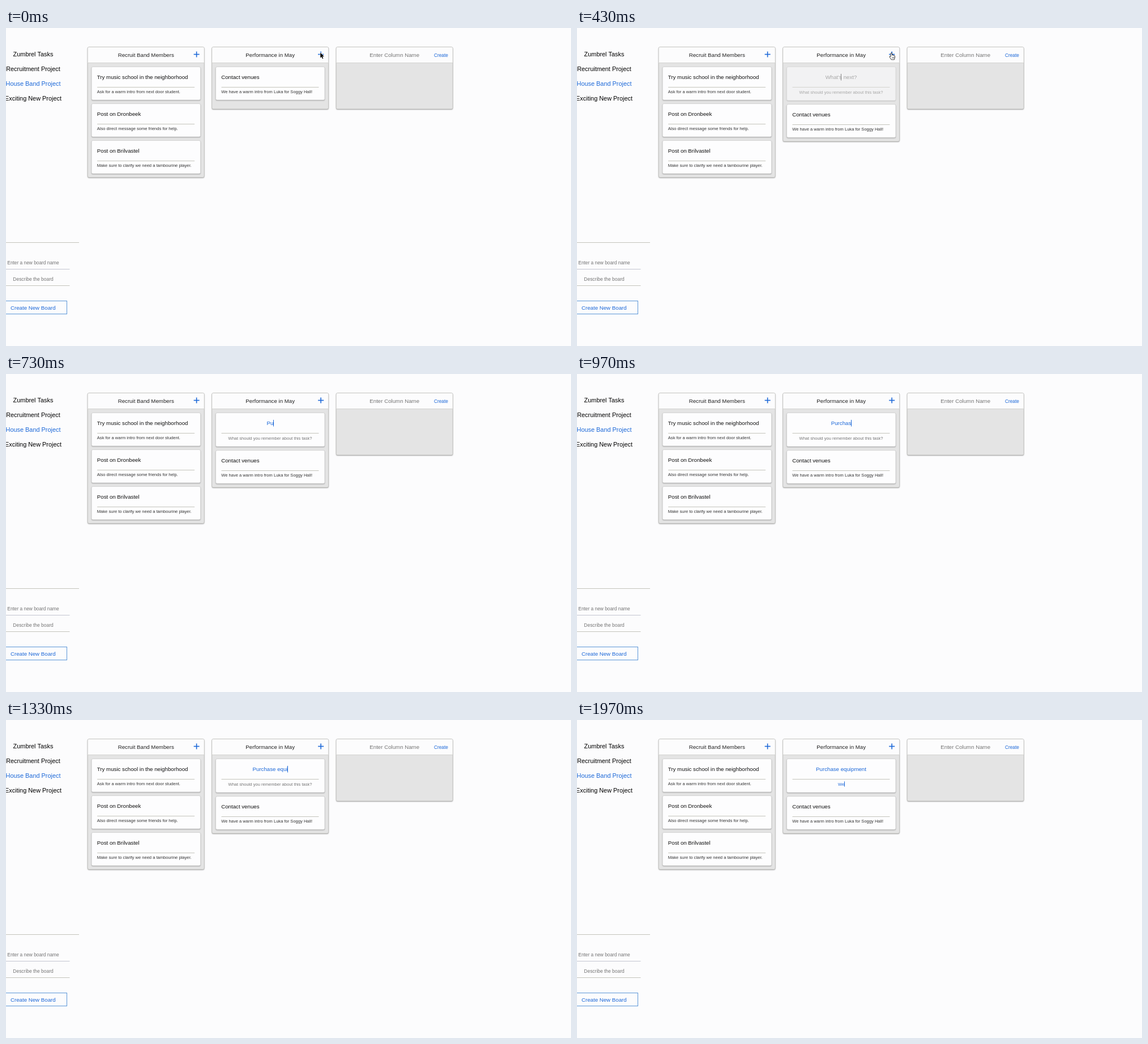
An HTML page with a canvas for the animation above (2000 ms loop, 998 by 561 pixels).

```html
<!DOCTYPE html>
<html lang="en">
<head>
<meta charset="utf-8">
<title>Task board</title>
<style>
html, body { margin: 0; width: 100%; height: 100%; overflow: hidden; background: #fcfcfd; }
canvas { display: block; }
</style>
</head>
<body>
<canvas id="stage" width="998" height="561"></canvas>
<script>
const ctx = document.getElementById('stage').getContext('2d');
const LOOP = 2000, BLUE = '#1c68d8', GREY = '#757575', INK = '#111', SOFT = '#333';
const TRAY = '#e4e4e4', TITLE = 9.7, NOTE = 7.57;

function text(s, x, y, size, color, align = 'left') {
  ctx.font = `${size}px "Liberation Sans", Arial, sans-serif`;
  ctx.textAlign = align;
  ctx.fillStyle = color;
  ctx.fillText(s, x, y);
  return ctx.measureText(s).width;
}

function rule(x1, x2, y, color = '#c4c4bc') {
  ctx.fillStyle = color;
  ctx.fillRect(x1, y, x2 - x1, 1);
}

function panel(x, y, w, h, fill, edge, shade) {
  ctx.save();
  ctx.shadowColor = `rgba(0,0,0,${shade})`;
  ctx.shadowBlur = 2;
  ctx.shadowOffsetY = 1;
  ctx.beginPath();
  ctx.roundRect(x, y, w, h, 2.5);
  ctx.fillStyle = fill;
  ctx.fill();
  ctx.restore();
  ctx.strokeStyle = edge;
  ctx.lineWidth = 0.8;
  ctx.stroke();
}

function column(x, bottom, name, color) {
  panel(x, 33.5, 206, bottom - 33.5, TRAY, '#bdbdb9', 0.4);
  ctx.beginPath();
  ctx.roundRect(x + 0.5, 34, 205, 27, [2, 2, 0, 0]);
  ctx.fillStyle = '#fcfcfd';
  ctx.fill();
  rule(x, x + 206, 61, '#d3d3d0');
  text(name, x + 103, 50.8, TITLE, color, 'center');
}

function plus(x) {
  ctx.fillStyle = BLUE;
  ctx.fillRect(x - 5, 45.7, 10, 1.6);
  ctx.fillRect(x - 0.8, 41.5, 1.6, 10);
}

function cardBase(x, y, h) {
  panel(x, y, 192.5, h, '#fdfdfe', '#d0d0d0', 0.35);
  rule(x + 10, x + 182, Math.floor(y + 35.5));
}

function card(x, y, title, note) {
  cardBase(x, y, 58.5);
  text(title, x + 9.7, y + 21.6, TITLE, INK);
  text(note, x + 9.7, y + 46.5, NOTE, SOFT);
}

function field(value, hint, x, y, size, focused) {
  const w = text(value || hint, x, y, size, value ? BLUE : GREY, 'center');
  if (!focused) return;
  ctx.fillStyle = value ? BLUE : '#333';
  ctx.fillRect(Math.round((value ? x + w / 2 : x) - 0.5), y - size * 0.95, 1, size * 1.2);
}

function typed(s, t, start, step) {
  return s.slice(0, Math.max(0, Math.floor((t - start) / step) + 1));
}

function titleAt(t) {
  if (t < 1150) return typed('Purchase q', t, 640, 50);
  return 'Purchase ' + typed('equipment', t, 1190, 38);
}

function draft(x, t) {
  const inNote = t >= 1660;
  cardBase(x, 68.5, 59.5);
  field(titleAt(t), "What's next?", x + 96, 90.1, TITLE, !inNote);
  field(typed('We', t, 1870, 60), 'What should you remember about this task?',
    x + 96, 115.6, NOTE, inNote);
  // Fade in by thinning a veil of the tray colour.
  ctx.globalAlpha = Math.max(0, 1 - (t - 365) / 120);
  ctx.fillStyle = TRAY;
  ctx.fillRect(x - 2, 66, 196.5, 66);
  ctx.globalAlpha = 1;
}

function shape(d, x, y, fill, edge, width) {
  const path = new Path2D(d);
  ctx.save();
  ctx.translate(x, y);
  ctx.lineJoin = 'round';
  ctx.lineWidth = width;
  ctx.strokeStyle = edge;
  ctx.stroke(path);
  ctx.fillStyle = fill;
  ctx.fill(path);
  ctx.restore();
}

function pointer(t) {
  if (t < 70) {
    shape('M0 0V9.2L2.1 7.2 3.6 10.7 5.1 10.1 3.6 6.7H6.6Z', 555.3, 43.6, '#000', '#fff', 1.2);
  } else if (t < 640) {
    shape('M1.8 1Q2.5 0 3.3 1V4.3Q4.6 3.7 5.1 4.7 6.3 4.2 6.8 5.2 8.2 4.9 8.2 6.2V8.5L7.2 11.6H2.6L0 7.6Q-.7 6.3.5 6.2L1.8 7.3Z',
      552.8, 43.8, '#fff', '#111', 1.5);
    ctx.fillStyle = '#333';
    for (const x of [556.6, 558.2, 559.7]) ctx.fillRect(x, 51, 0.6, 2.8);
  }
}

function sidebar() {
  ['Zumbrel Tasks', 'Recruitment Project', 'House Band Project', 'Exciting New Project']
    .forEach((s, i) => text(s, 48, 50 + 26 * i, 10.9, i === 2 ? BLUE : '#000', 'center'));
  rule(0, 129, 378);
  text('Enter a new board name', 48, 416.6, 8.35, GREY, 'center');
  rule(0, 112.5, 425, '#c3c6d0');
  text('Describe the board', 48, 446, 8.45, GREY, 'center');
  rule(0, 112.5, 454);
  ctx.strokeStyle = '#5b97d8';
  ctx.lineWidth = 1;
  ctx.strokeRect(-11.5, 481.5, 119, 23);
  text('Create New Board', 47.8, 496.7, TITLE, BLUE, 'center');
}

function draw() {
  const t = performance.now() % LOOP, open = t >= 370;
  ctx.fillStyle = '#fcfcfd';
  ctx.fillRect(0, 0, 998, 561);
  sidebar();

  column(144.2, 263.5, 'Recruit Band Members', '#222');
  plus(336.6);
  card(151.1, 68.5, 'Try music school in the neighborhood', 'Ask for a warm intro from next door student.');
  card(151.1, 133.5, 'Post on Dronbeek', 'Also direct message some friends for help.');
  card(151.1, 198.5, 'Post on Brilvastel', 'Make sure to clarify we need a tambourine player.');

  column(363.7, open ? 200 : 143, 'Performance in May', '#222');
  plus(556.2);
  if (open) draft(370.5, t);
  card(370.5, open ? 134.7 : 68.5, 'Contact venues', 'We have a warm intro from Luka for Soggy Hall!');

  column(583.2, 143, 'Enter Column Name', GREY);
  text('Create', 780.8, 50.6, 8.3, BLUE, 'right');

  pointer(t);
  requestAnimationFrame(draw);
}
draw();
</script>
</body>
</html>
```
